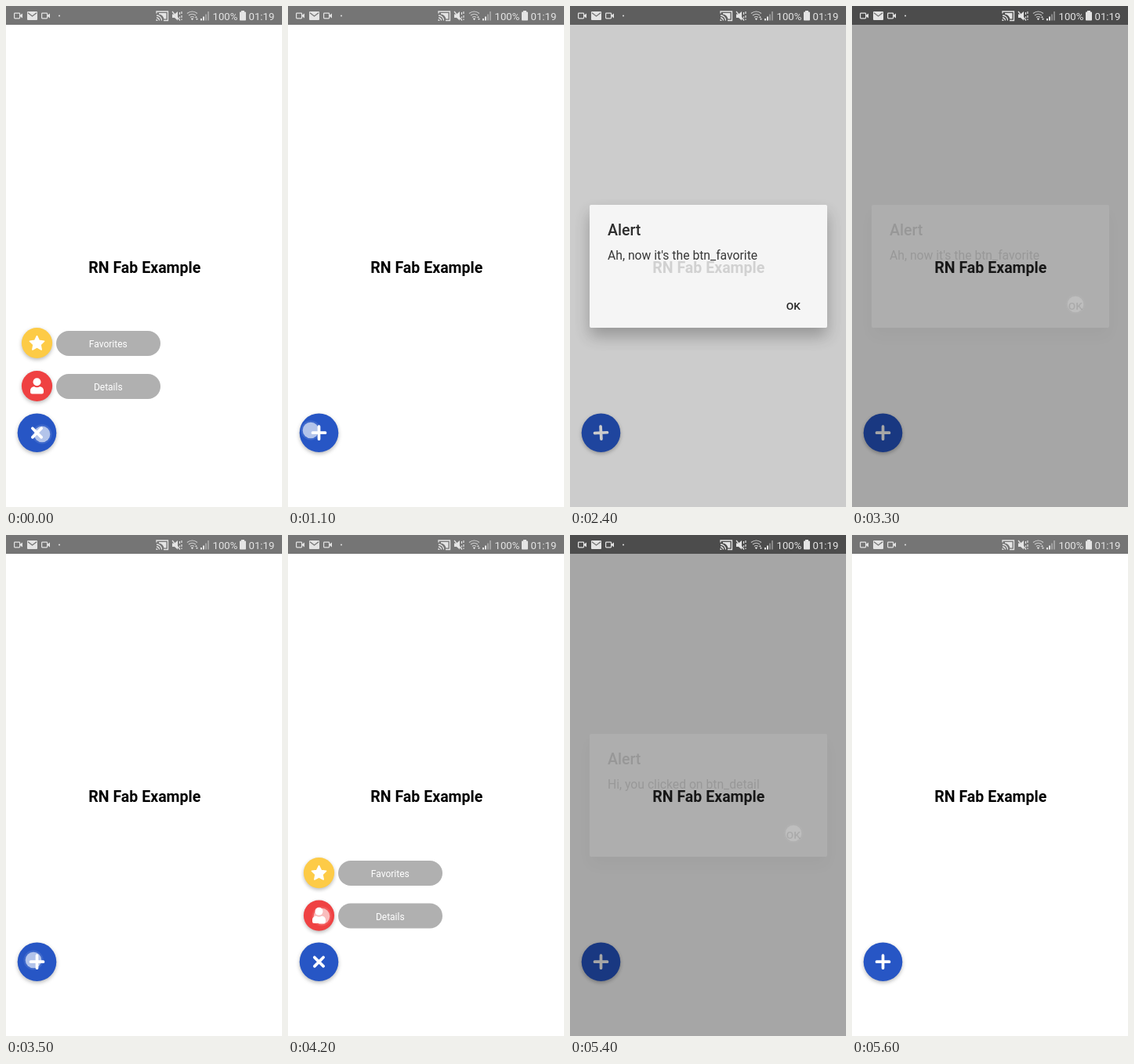
Recreate the animation shown at these times as an HTML page. Size 352 px wide and 640 px high, loop 8.7 s.

```html
<!DOCTYPE html>
<html lang="en">
<head>
<meta charset="utf-8">
<title>FAB menu</title>
<style>
  html, body { margin: 0; width: 100%; height: 100%; overflow: hidden; background: #fff; }
  svg { display: block; }
  text { font-family: Roboto, sans-serif; }
  .title { font-size: 19.56px; font-weight: 700; text-anchor: middle; }
  .label { font-size: 12px; fill: #fff; text-anchor: middle; }
  .head { font-size: 19.56px; font-weight: 500; fill: #0c0c0c; }
  .msg { font-size: 15.72px; fill: #181818; }
  .ok { font-size: 13.7px; font-weight: 500; }
  .clock { font-size: 13.2px; }
  .lift { filter: drop-shadow(0 2px 2.5px rgba(0, 0, 0, .28)); }
  .card { fill: #fff; filter: drop-shadow(0 11px 10px rgba(0, 0, 0, .32)); }
  .line { fill: none; stroke: #e4e4e4; }
</style>
</head>
<body>
<svg width="352" height="640" viewBox="0 0 352 640">
  <defs>
    <g id="cam">
      <rect class="line" x=".6" y=".6" width="7" height="6.8" rx=".8" stroke-width="1.2"/>
      <path d="M8 3.2 11 1v6L8 4.8z"/>
    </g>
    <rect id="pill" x="64" y="-15.5" width="133" height="32" rx="16" fill="#b0b0b0"/>
  </defs>

  <rect width="352" height="24" fill="#757575"/>
  <text class="title" x="176.8" y="340.6">RN Fab Example</text>

  <g id="fav">
    <circle class="lift" cx="39.5" cy="430.5" r="19.6" fill="#fdcb46"/>
    <path id="star" fill="#fff" stroke="#fff" stroke-width="1.6" stroke-linejoin="round"/>
    <use href="#pill" y="430.5"/>
    <text class="label" x="130.3" y="436">Favorites</text>
  </g>
  <g id="det">
    <circle class="lift" cx="39.5" cy="485.5" r="19.6" fill="#ef4142"/>
    <circle cx="39.5" cy="480.3" r="5" fill="#fff"/>
    <path d="M36 486.2a7 7 0 0 0 7 0c3 0 5 2.2 5 5v2a2.2 2.2 0 0 1-2.2 2.2H33.2A2.2 2.2 0 0 1 31 493.2v-2c0-2.8 2-5 5-5z" fill="#fff"/>
    <use href="#pill" y="485.5"/>
    <text class="label" x="130.3" y="491">Details</text>
  </g>

  <g transform="translate(39.5 545.2)">
    <circle class="lift" r="24.8" fill="#2756c5"/>
    <path id="plus" d="M-8 0H8M0-8V8" stroke="#fff" stroke-width="3.7" stroke-linecap="round"/>
  </g>

  <rect id="dim" width="352" height="640"/>

  <g id="dialog">
    <rect class="card" x="25" y="254" width="303" height="157" rx="2"/>
    <text class="head" x="48" y="293">Alert</text>
    <text class="msg" id="msg" x="48" y="323.6"></text>
    <text class="ok" x="275.8" y="388">OK</text>
  </g>

  <g fill="#e4e4e4">
    <use href="#cam" x="10" y="8.5"/>
    <rect x="27" y="7" width="13" height="11" rx="1"/>
    <path d="M28 8.8 33.5 13 39 8.8" fill="none" stroke="#757575" stroke-width="1.3"/>
    <use href="#cam" x="45" y="8.5"/>
    <circle cx="68" cy="12.5" r="1"/>
    <path class="line" d="M192 9.5V7H206.500V18.500H201M192 12a6.500 6.500 0 0 1 6.500 6.500M192 15a3.500 3.500 0 0 1 3.500 3.500" stroke-width="1.3"/>
    <path d="M195 9h9.500v7.500H201.500Q200 11 195 10.500zM191.500 17a2 2 0 0 1 2 2h-2z"/>
    <path d="M212 10.500h3l4-3.500v11.500l-4-3.500h-3z"/>
    <path class="line" d="M212 7l10 11.500M221.500 8v3M221.500 13.500v2M224 7v3M224 12v3M224 16.500v1.500" stroke-width="1.2"/>
    <path class="line" d="M231 9.500q6.500-5 13 0M233 12q4.500-3.500 9 0M235 14.500q2.500-2 5 0" stroke-width="1.2" opacity=".8"/>
    <path d="M235.800 16q1.700-1.200 3.400 0l-1.700 2.300zM241 15l1.500-2 1.500 2zM242 16h3l-1.500 2z"/>
    <path d="M248 16h2v2.500h-2zM251 13.500h2v5h-2z"/>
    <path d="M254 10.500h2v8h-2zM257 7h2v11.500h-2z" opacity=".4"/>
    <path d="M300 6h4v1.500h1.200q.8 0 .8.800v9.400q0 .8-.8.800h-6.400q-.8 0-.8-.8V8.300q0-.8.8-.8H300z"/>
    <text class="clock" x="263.500" y="17.600">100%</text>
    <text class="clock" x="309.500" y="17.600">01:19</text>
  </g>

  <g id="touch" fill="#fff">
    <circle r="12.5" opacity=".16"/>
    <circle r="10.3"/>
  </g>
</svg>
<script>
const LOOP = 8700, TICK = 100;
const $ = id => document.getElementById(id);
const clamp = v => Math.min(1, Math.max(0, v));

// the menu starts open and flips at each of these times
const toggles = [100, 1100, 2000, 3500, 4300];
const alerts = [
  { from: 2300, to: 3200, text: "Ah, now it's the btn_favorite" },
  { from: 4600, to: 5300, text: 'Hi, you clicked on btn_detail' }
];
const taps = [
  { from: 0, to: 100, x: 46, y: 547 },
  { from: 1100, to: 1200, x: 29, y: 542 },
  { from: 1800, to: 1900, x: 43, y: 432 },
  { from: 3000, to: 3160, x: 285, y: 381 },
  { from: 3500, to: 3600, x: 35, y: 543 },
  { from: 4200, to: 4300, x: 43, y: 487 },
  { from: 5100, to: 5260, x: 285, y: 381 }
];

const latest = (list, t) => list.filter(e => e.from <= t).pop();

// 0 to 1 with a small overshoot, s in seconds
const spring = s => 1 - Math.exp(-7 * s) * (Math.cos(10 * s) + .7 * Math.sin(10 * s));

// linear rise after `from`, linear fall after `to`
const fade = ({ from, to }, t, rise, fall) =>
  Math.min(clamp((t - from) / rise), clamp(1 - (t - to) / fall));

function menuAt(t) {
  const past = toggles.filter(at => at <= t);
  if (!past.length) return 1;
  const p = spring((t - past[past.length - 1]) / 1000);
  return past.length % 2 ? 1 - p : p;
}

function placeOption(id, drop, p) {
  $(id).setAttribute('opacity', clamp(p));
  $(id).setAttribute('transform', `translate(0 ${drop * (1 - p)})`);
}

function draw(t) {
  const p = menuAt(t);
  placeOption('fav', 114.7, p);
  placeOption('det', 59.7, p);
  $('plus').setAttribute('transform', `rotate(${45 * p})`);

  const alert = latest(alerts, t) || alerts[0];
  $('msg').textContent = alert.text;
  $('dim').setAttribute('opacity', .6 * fade(alert, t, 300, 240));
  $('dialog').setAttribute('opacity', fade(alert, t, 122, 110));

  const tap = latest(taps, t);
  $('touch').setAttribute('opacity', .65 * clamp(1 - (t - tap.to) / 200));
  $('touch').setAttribute('transform', `translate(${tap.x} ${tap.y})`);
}

const star = Array.from({ length: 10 }, (_, i) => {
  const r = i % 2 ? 4.7 : 9.6, a = (i / 5 - .5) * Math.PI;
  return `${39.5 + r * Math.cos(a)} ${431.2 + r * Math.sin(a)}`;
});
$('star').setAttribute('d', `M${star.join('L')}z`);

// the picture advances in whole ticks
const start = performance.now();
function loop() {
  const t = (performance.now() - start) % LOOP;
  draw(Math.floor(t / TICK) * TICK);
  requestAnimationFrame(loop);
}
loop();
</script>
</body>
</html>
```
